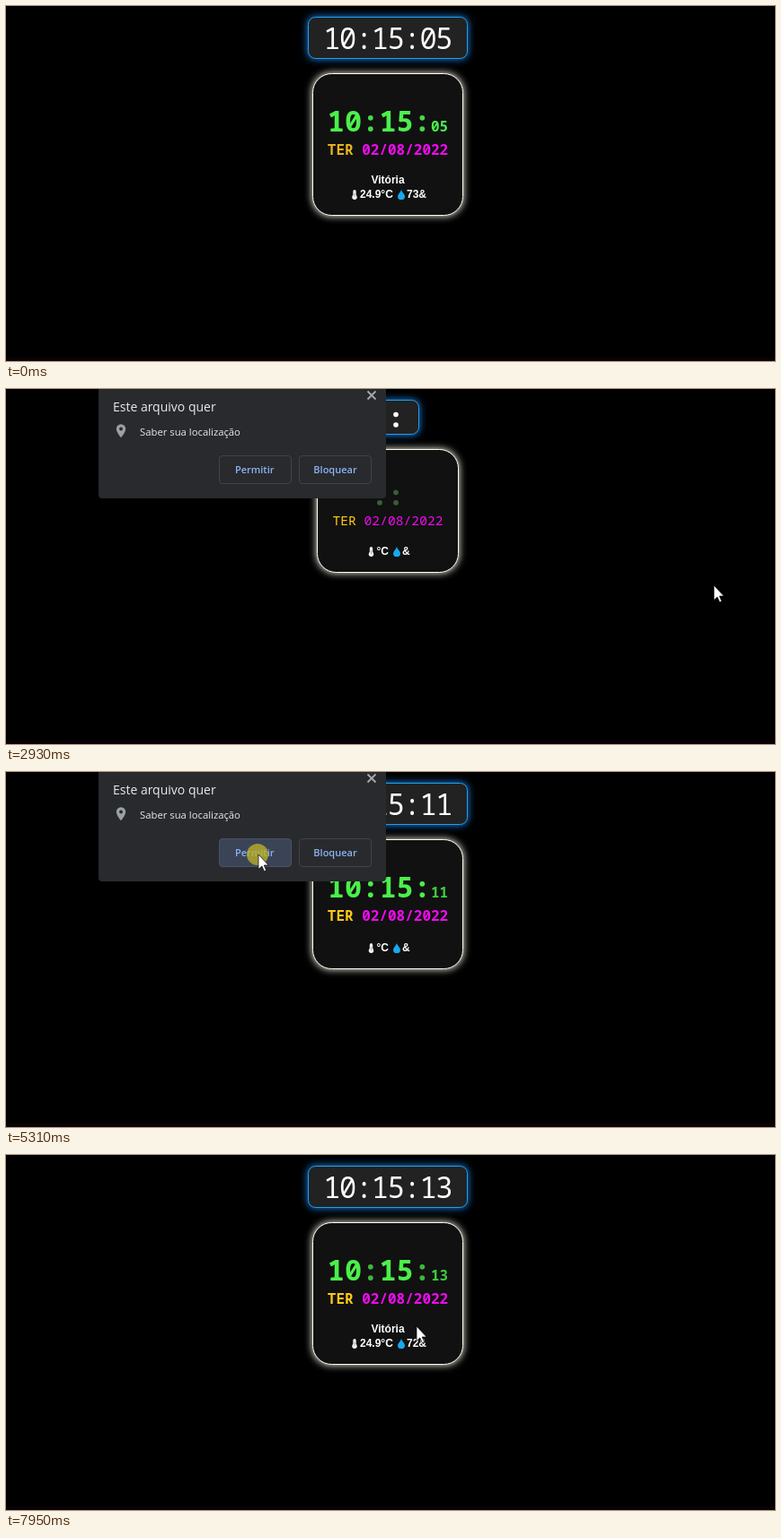
Write an HTML page that moves like this. It is 856 px wide and 396 px high and loops after 8000 ms.

```html
<!DOCTYPE html>
<html lang="pt">
<head>
<meta charset="utf-8">
<title>Relógio</title>
<style>
  html, body { margin: 0; width: 100%; height: 100%; overflow: hidden; background: #000; }
  svg { display: block; width: 100%; height: 100%; }
  .mono { font-family: "Noto Sans Mono", monospace; }
  .info { font: bold 12px "Liberation Sans", Arial, sans-serif; fill: #fff; }
  .ui { font-family: "Open Sans", "Noto Sans", sans-serif; fill: #e8eaed; }
  .btn { font-size: 11px; font-weight: 600; fill: #8ab4f8; text-anchor: middle; }
</style>
</head>
<body>
<svg viewBox="0 0 856 396">
  <defs>
    <filter id="blur" x="-20%" y="-40%" width="140%" height="180%"><feGaussianBlur stdDeviation="4"/></filter>
  </defs>
  <rect width="856" height="396" fill="#000"/>
  <rect y="392" width="856" height="4" fill="#0a0205"/>

  <rect id="topGlow" rx="8" fill="#1a86f0" filter="url(#blur)"/>
  <rect id="topBox" rx="8" fill="#222" stroke="#1e9fee"/>
  <text id="topText" class="mono" x="353.2" y="48" font-size="32" letter-spacing="-1.33" fill="#fff"></text>

  <rect id="cardGlow" rx="21" fill="#fffbee" filter="url(#blur)"/>
  <rect id="cardBox" rx="21" fill="#111" stroke="#fffdf0"/>
  <g id="clock" class="mono" font-weight="600" fill="#4bef4b">
    <text x="357.8" y="140" font-size="32">10<tspan class="colon">:</tspan>15<tspan class="colon">:</tspan></text>
    <text x="473" y="140" font-size="16"><tspan id="tens"></tspan><tspan id="units"></tspan></text>
  </g>
  <g id="dots">
    <g fill="#fff">
      <circle cx="416" cy="28.5" r="2.8"/><circle cx="416" cy="40" r="2.8"/>
      <circle cx="434" cy="28.5" r="2.8"/><circle cx="434" cy="40" r="2.8"/>
    </g>
    <g fill="#365f38">
      <circle cx="416" cy="115.3" r="2.9"/><circle cx="416" cy="126.8" r="2.9"/>
      <circle cx="434" cy="115.3" r="2.9"/><circle cx="434" cy="126.8" r="2.9"/>
    </g>
  </g>
  <text id="date" class="mono"><tspan id="day">TER</tspan> <tspan fill="#f00af0">02/08/2022</tspan></text>

  <text id="city" class="info" x="425" y="198" text-anchor="middle">Vitória</text>
  <g id="thermo">
    <rect x="-1.7" y="-9" width="3.4" height="9" rx="1.7" fill="#e9eef0"/>
    <circle cy="-.8" r="2.7" fill="#f4f4f4"/>
    <path d="M0-5V-1" stroke="#c9a9a4"/>
  </g>
  <text id="temp" class="info"></text>
  <path id="drop" d="M0-9C1-6 4-3.5 4-1.6A4 3.6 0 0 1-4-1.6C-4-3.5-1-6 0-9Z" fill="#17a9f0"/>
  <text id="hum" class="info"></text>

  <g id="popup" class="ui">
    <rect x="103" y="-10" width="320" height="132" rx="4" fill="#292a2d"/>
    <path d="M402.5 2.5l9 9m0-9l-9 9" stroke="#a5a9ae" stroke-width="1.8"/>
    <text x="119" y="25" font-size="14">Este arquivo quer</text>
    <path d="M128 39.3a5.2 5.2 0 0 1 5.2 5.2c0 3.8-5.2 9.7-5.2 9.7s-5.2-5.9-5.2-9.7a5.2 5.2 0 0 1 5.2-5.2Z" fill="#9aa0a6"/>
    <circle cx="128" cy="44.5" r="1.9" fill="#292a2d"/>
    <text x="149" y="52" font-size="11.3">Saber sua localização</text>
    <g stroke="#414347">
      <rect id="allow" x="237.5" y="74.5" width="80" height="31" rx="3.5"/>
      <rect x="326.5" y="74.5" width="80" height="31" rx="3.5" fill="none"/>
    </g>
    <text class="btn" x="276.7" y="94">Permitir</text>
    <text class="btn" x="366.5" y="94">Bloquear</text>
  </g>

  <circle id="click" cx="280" cy="92" r="12" fill="#bdb02a" fill-opacity=".78"/>
  <path id="cursor" d="M0 0V16.5L3.8 13 6.4 18.7 8.7 17.7 6.2 12H11.2Z" fill="#fff" stroke="#000" stroke-width=".7"/>
</svg>
<script>
const LOOP = 8000, RELOAD = 2780, POPUP = 2930, READY = 3050, TICK = 3060, CLOSED = 5450, CITY = 7060;
const $ = id => document.getElementById(id);
const colons = document.querySelectorAll('.colon');

// time, x, y of the pointer tip
const path = [
  [70, 789, 220], [400, 788, 219], [3620, 788, 219], [4270, 289, 97], [4700, 281, 92], [5420, 281, 92],
  [5650, 400, 215], [5850, 510, 303], [6180, 478, 216], [6420, 456, 187], [6800, 454, 182],
  [7350, 454, 182], [7700, 457, 191]
];

function set(el, attrs) {
  for (const k in attrs) el.setAttribute(k, attrs[k]);
}

function show(id, on) {
  $(id).style.display = on ? '' : 'none';
}

function box(name, x, y, w, h) {
  set($(name + 'Glow'), { x, y, width: w, height: h });
  set($(name + 'Box'), { x: x + .5, y: y + .5, width: w - 1, height: h - 1 });
}

function pointer(t) {
  const i = path.findIndex(p => p[0] > t);
  if (i < 0) return path[path.length - 1].slice(1);
  if (i === 0) return path[0].slice(1);
  const [a, b] = [path[i - 1], path[i]];
  let k = (t - a[0]) / (b[0] - a[0]);
  k = k * k * (3 - 2 * k);
  return [a[1] + (b[1] - a[1]) * k, a[2] + (b[2] - a[2]) * k];
}

function seconds(t) {
  if (t >= RELOAD) return 9 + Math.max(0, Math.floor((t - TICK) / 1000));
  return 5 + (t >= 340) + (t >= 1340) + (t >= 2440);
}

function weather(t, bare, hasCity) {
  const y = bare ? 185 : hasCity ? 214 : 200;
  const x = hasCity ? 394 : 412.5;
  const end = x + (hasCity ? 37 : 13.5);
  const place = (id, px) => set($(id), { transform: `translate(${px} ${y})` });
  $('temp').textContent = (hasCity ? '24.9' : '') + '°C';
  $('hum').textContent = (hasCity ? (t < RELOAD ? '73' : '72') : '') + '&';
  place('thermo', x - 6);
  place('temp', x);
  place('drop', end + 9);
  place('hum', end + 15);
  show('city', hasCity);
}

function draw(t) {
  const fresh = t >= RELOAD;
  const bare = fresh && t < READY;
  const hasCity = !fresh || t >= CITY;

  if (bare) {
    box('top', 390, 12, 70, 39);
    box('card', 346, 67, 158, 138);
  } else {
    box('top', 336, 12, 178, 47);
    box('card', 341, 75, 168, hasCity ? 159 : 145);
  }
  show('topText', !bare);
  show('clock', !bare);
  show('dots', bare);

  const s = String(seconds(t)).padStart(2, '0');
  $('topText').textContent = '10:15:' + s;
  $('tens').textContent = s[0];
  $('units').textContent = s[1];
  set($('tens'), { fill: fresh ? '#3fcb3f' : '#4bef4b' });
  set($('units'), { fill: fresh ? '#3fcb3f' : t < 340 ? '#4bef4b' : '#3f8340' });

  const blink = Math.min(1, .75 + .5 * Math.cos(2 * Math.PI * (t / 1000 - .2)));
  colons.forEach(c => set(c, { 'fill-opacity': blink }));

  set($('date'), bare
    ? { x: 363.4, y: 152, 'font-size': 14.667, 'font-weight': 500 }
    : { x: 357.8, y: 166, 'font-size': 16, 'font-weight': 700 });
  set($('day'), { fill: fresh ? '#ffc914' : '#e6b31e' });
  weather(t, bare, hasCity);

  show('popup', t >= POPUP && t < CLOSED);
  const hover = t >= 4370;
  set($('allow'), { fill: hover ? '#3b4456' : 'none', stroke: hover ? '#4a5365' : '#414347' });
  show('click', t >= 5240 && t < CLOSED);

  show('cursor', t >= 70);
  set($('cursor'), { transform: `translate(${pointer(t).map(Math.round).join(' ')})` });
}

const start = performance.now();
function frame() {
  draw((performance.now() - start) % LOOP);
  requestAnimationFrame(frame);
}
frame();
</script>
</body>
</html>
```
